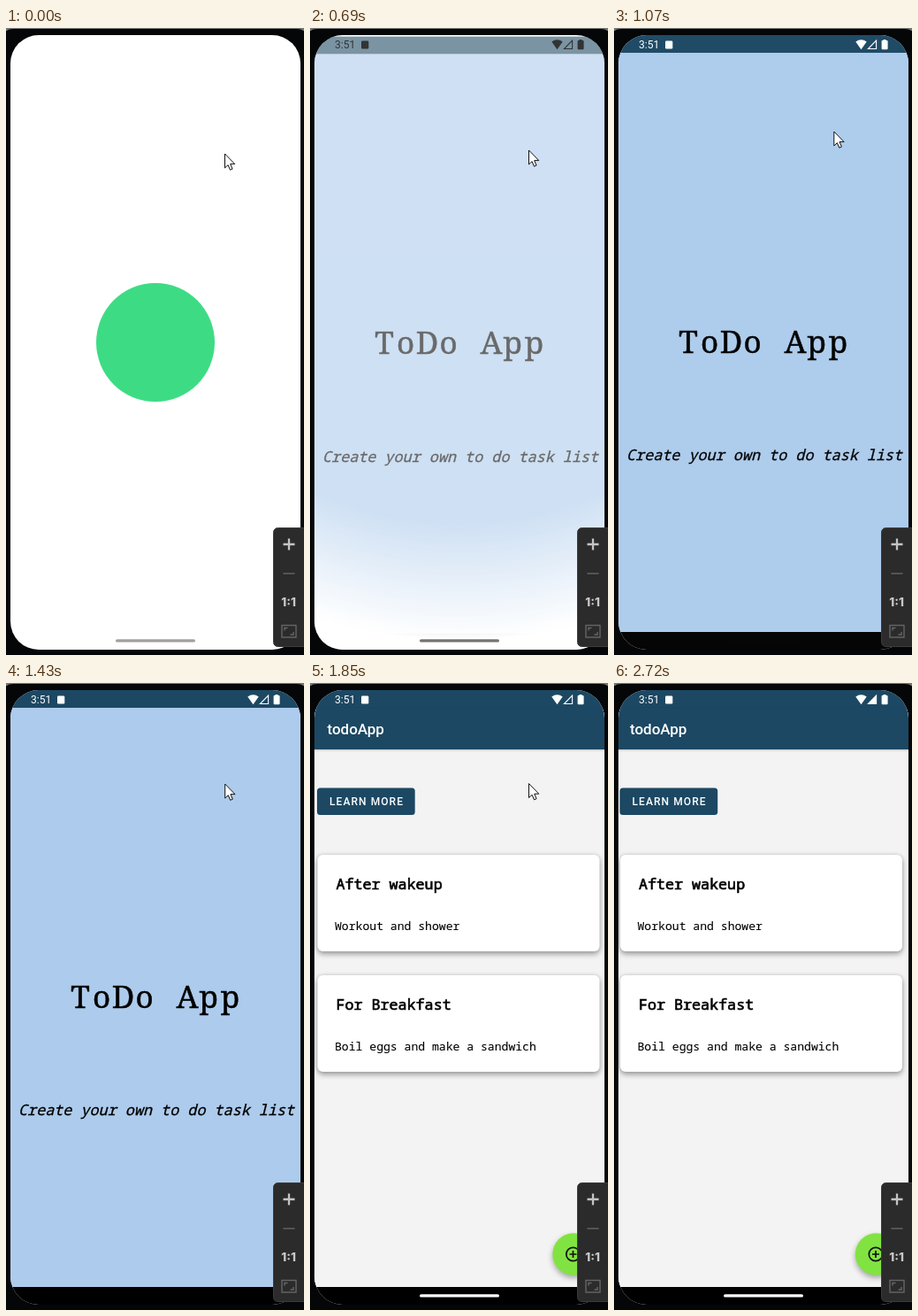
These frames come from a looping animation (337 px wide and 708 px high, 3.37 s). An HTML page:

```html
<!DOCTYPE html>
<html lang="en">
<head>
<meta charset="utf-8">
<style>
html, body { margin: 0; width: 100%; height: 100%; overflow: hidden; background: #050607; }
svg { display: block; width: 100%; height: 100%; }
text { white-space: pre; }
.mono { font-family: "Noto Sans Mono", "DejaVu Sans Mono", monospace; stroke: #000; stroke-width: .3; }
.ui { font-family: Roboto, Inter, sans-serif; font-weight: 500; fill: #fff; }
#title { font: 35px "Noto Serif", serif; text-anchor: middle; stroke: #000; stroke-width: .5; }
#tag { font-size: 16.8px; font-style: italic; }
.head { font-size: 16.7px; stroke-width: .65; }
.body { font-size: 13.1px; stroke-width: .1; }
.card rect { fill: #fff; filter: drop-shadow(0 3px 3px #0005) drop-shadow(0 0 2px #0002); }
</style>
</head>
<body>
<svg viewBox="0 0 337 708">
  <defs>
    <clipPath id="screen"><rect x="5" y="8" width="328" height="694" rx="32"/></clipPath>
    <radialGradient id="fade" gradientUnits="userSpaceOnUse" cx="169" cy="160">
      <stop offset=".75" stop-color="#fff" stop-opacity="0"/>
      <stop offset="1" stop-color="#fff"/>
    </radialGradient>
  </defs>

  <!-- phone body -->
  <rect width="337" height="708" fill="#777"/>
  <rect x="-6" y="1" width="349" height="716" rx="14" fill="#050607"/>

  <g clip-path="url(#screen)">
    <rect width="337" height="708" fill="#fff"/>
    <circle id="logo" cx="169" cy="355" r="67" fill="#3ddc84"/>

    <g id="welcome">
      <rect y="8" width="337" height="20" fill="#1c4863"/>
      <rect y="28" width="337" height="654" fill="#adcbec"/>
      <rect y="682" width="337" height="30"/>
      <g id="words">
        <text id="title" y="366.5"></text>
        <text id="tag" class="mono" x="14" y="488.4">Create your own to do task list</text>
      </g>
      <rect y="28" width="337" height="680" fill="url(#fade)"/>
    </g>

    <g id="list">
      <rect y="28" width="337" height="654" fill="#f3f3f3"/>
      <rect y="28" width="337" height="47" fill="#1c4863" style="filter:drop-shadow(0 1px 1px #0003)"/>
      <g id="content">
        <text class="ui" x="18" y="58" font-size="17">todoApp</text>
        <rect x="6.5" y="118.5" width="110.7" height="30.5" rx="3.5" fill="#1c4863"/>
        <text class="ui" x="20.5" y="138" font-size="12" letter-spacing="1.07">LEARN MORE</text>
        <g id="cards"></g>
        <circle cx="296.5" cy="645" r="23.7" fill="#81e341" style="filter:drop-shadow(0 3px 3px #0005)"/>
        <g fill="none" stroke="#111" stroke-width="1.7">
          <circle cx="296" cy="645" r="7.7"/>
          <path d="M292 645h8M296 641v8"/>
        </g>
      </g>
    </g>

    <g id="status">
      <text x="28" y="23.2" font-size="12" style="font-family:Roboto,sans-serif">3:51</text>
      <rect x="58" y="14.5" width="8.3" height="9" rx="1.2"/>
      <path d="M279.5 24.2L273.3 15.6Q279.5 10.8 285.7 15.6Z"/>
      <path id="signal" d="M296.6 14V23.5H287.4Z" stroke-width="1.1"/>
      <path d="M304.5 13h3v1h1.2q.9 0 .9 1v8q0 1.2-1 1.2h-5q-1 0-1-1.2v-8q0-1 .9-1h1z"/>
    </g>
    <rect id="handle" x="124" y="690.2" width="90" height="3.4" rx="1.7"/>
  </g>

  <path id="cursor" d="M0 0V16L3.6 12.7 6 18.3 8.6 17.1 6.2 11.6H11.3Z" fill="#fff" stroke="#111"/>

  <!-- zoom panel -->
  <rect x="302.5" y="564.5" width="50" height="134" rx="5" fill="#2b2b2b" stroke="#3b3b3b"/>
  <g fill="none" stroke="#666" stroke-width="1.4">
    <path d="M313.5 583h13M320 576.5v13" stroke="#c4c4c4" stroke-width="2.3"/>
    <path d="M313.5 616h13"/>
    <rect x="312" y="674.5" width="16" height="13.5"/>
    <path d="M315 680.5v-3h3.5M325 682v3h-3.5"/>
  </g>
  <text x="319.7" y="652.7" text-anchor="middle" font-size="13.5" font-weight="800" fill="#c8c8c8" style="font-family:Inter,sans-serif">1:1</text>
</svg>
<script>
const LOOP = 3370, STEP = 120;
const SPLASH_OUT = 690, LIST_IN = 1700, LIST_SOLID = 1850, SETTLE = 2000;
const starts = [0, 150, SPLASH_OUT, 950, LIST_IN, LIST_SOLID, SETTLE];

const $ = id => document.getElementById(id);
const set = (id, name, value) => $(id).setAttribute(name, value);
const move = (id, x, y) => set(id, "transform", `translate(${x} ${y})`);
const ramp = (t, from, to) => Math.min(1, Math.max(0, (t - from) / (to - from)));
const decay = (t, from, span) => Math.exp(-Math.max(0, t - from) / span);

// Fixed-pitch slab title.
$("title").innerHTML = [..."ToDo App"]
  .map((c, i) => `<tspan x="${84 + i * 24.2}">${c}</tspan>`).join("");

const card = (y, head, body) => `<g class="card">
  <rect x="7" y="${y}" width="319" height="109" rx="6"/>
  <text class="mono head" x="28" y="${y + 39}">${head}</text>
  <text class="mono body" x="26.5" y="${y + 85}">${body}</text></g>`;
$("cards").innerHTML = card(194, "After wakeup", "Workout and shower") +
  card(330, "For Breakfast", "Boil eggs and make a sandwich");

function stepped(now) {
  const start = starts.findLast(s => s <= now);
  return start + Math.floor((now - start) / STEP) * STEP;
}

function draw(t) {
  const splash = t < SPLASH_OUT, listOn = t >= LIST_IN, solid = t >= LIST_SOLID;

  const shown = 1 - .415 * decay(t, SPLASH_OUT, 126);
  set("logo", "opacity", +splash);
  set("welcome", "opacity", splash ? 0 : shown);
  move("welcome", 0, 1.6 * decay(t, SPLASH_OUT, 45));
  move("words", listOn ? -18 : 0, 0);
  set("fade", "r", 530 + 1.42 * Math.max(0, t - SPLASH_OUT));

  set("list", "opacity", solid ? 1 : listOn ? .4 : 0);
  set("cards", "opacity", solid ? 1 : .07);
  move("content", 15 * decay(t, LIST_IN, 65), 0);

  const ink = t < SPLASH_OUT + STEP ? "#333" : "#fff";
  set("status", "fill", ink);
  set("status", "opacity", ramp(t, 30, 390));
  set("signal", "stroke", ink);
  set("signal", "fill", t < SETTLE ? "none" : ink);

  const gray = solid ? 255 : splash ? 160 : 280 * (1 - shown);
  set("handle", "fill", `rgb(${gray},${gray},${gray})`);

  // Drift up along a slight arc, then sweep off the bottom edge.
  const drift = 1 - decay(t, SPLASH_OUT, 195);
  const exit = 1 - (1 - ramp(t, 1900, 2700)) ** 2;
  move("cursor",
    247.5 + 3 * Math.sin(Math.PI * drift) + 18 * exit,
    142 - 4 * ramp(t, 30, 270) - 24.5 * drift + 600 * exit);
}

function frame() {
  draw(stepped(performance.now() % LOOP));
  requestAnimationFrame(frame);
}
frame();
</script>
</body>
</html>
```
